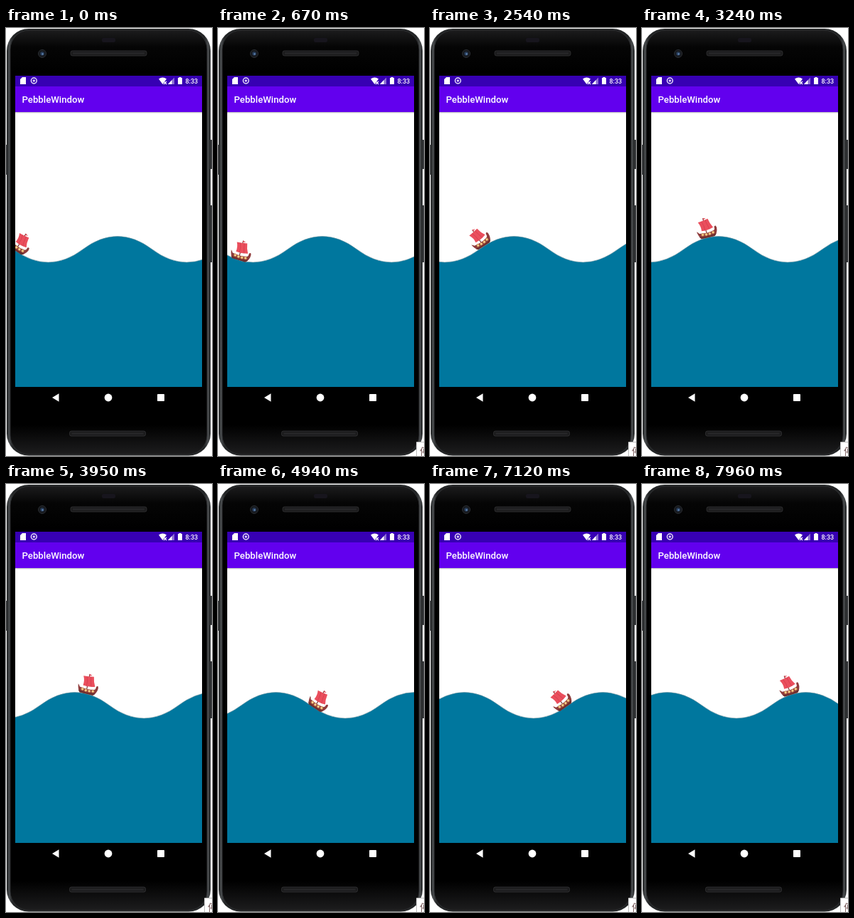
An HTML page without scripts for the animation above (8000 ms loop, 290 by 601 pixels).

```html
<!DOCTYPE html>
<html lang="en">
<head>
<meta charset="utf-8">
<title>Boat on a wave</title>
<style>
  html, body { margin: 0; width: 100%; height: 100%; overflow: hidden; background: #fff; }
  svg { display: block; width: 290px; height: 601px; }
  text { font-family: Roboto, sans-serif; fill: #fff; }
  .title { font-size: 13.2px; font-weight: 500; }
  .clock { font-size: 9px; font-weight: 500; }
  .tip { font: 13px "Noto Sans CJK SC", "Noto Sans CJK", sans-serif; fill: #705050; }
</style>
</head>
<body>
<svg viewBox="0 0 290 601">
  <defs>
    <linearGradient id="rim">
      <stop offset="0" stop-color="#1b1d1e"/>
      <stop offset=".012" stop-color="#4a4d4f"/>
      <stop offset=".03" stop-color="#222425"/>
      <stop offset=".97" stop-color="#222425"/>
      <stop offset=".988" stop-color="#4a4d4f"/>
      <stop offset="1" stop-color="#1b1d1e"/>
    </linearGradient>
    <linearGradient id="face" x2="0" y2="1">
      <stop offset="0" stop-color="#1c1c1d"/>
      <stop offset=".04" stop-color="#050505"/>
      <stop offset=".1" stop-color="#000"/>
      <stop offset=".93" stop-color="#000"/>
      <stop offset="1" stop-color="#1d1d1e"/>
    </linearGradient>
    <clipPath id="view"><path d="M13 118h263v386h-263z"/></clipPath>
    <g id="slot">
      <rect width="107" height="7" rx="2.5" fill="#1b1b1c" stroke="#343436" stroke-width=".8"/>
      <path d="M3 3.5h101" stroke="#29292b" stroke-width="2"/>
    </g>
    <circle id="shield" r="1.9" fill="#f3d08a" stroke="#b5633f" stroke-width=".6"/>
  </defs>

  <!-- phone -->
  <path d="M286 157h4v41h-4zM286 249h4v80h-4z" fill="#393b3d"/>
  <path d="M0 164h2v42h-2z" fill="#4a4c4e"/>
  <rect x="1" y="1" width="287" height="599.5" rx="31" fill="url(#rim)"/>
  <rect x="6" y="3" width="277" height="596" rx="27" fill="url(#face)" stroke="#303234" stroke-width=".8"/>
  <rect x="135" y="14" width="19" height="6" rx="2" fill="#17151d"/>
  <use href="#slot" x="91" y="32"/>
  <use href="#slot" x="89.500" y="566"/>
  <circle cx="51" cy="36" r="5.500" fill="#17191d" stroke="#292c31"/>
  <circle cx="51" cy="36" r="2.800" fill="#263b58"/>
  <circle cx="51.500" cy="36.500" r="1.200" fill="#6689b5"/>

  <!-- screen -->
  <path d="M13 118h263v386h-263z" fill="#fff"/>
  <path d="M13 67h263v15h-263z" fill="#3700b3"/>
  <path d="M13 82h263v36h-263z" fill="#6200ee"/>
  <path d="M13 118.500h263" stroke="#c4c4c8"/>
  <path d="M13 119.500h263" stroke="#ebebed"/>
  <text class="title" x="22.500" y="105">PebbleWindow</text>

  <!-- status icons -->
  <g fill="#fff">
    <path d="M23 69h5v10h-8v-7z"/>
    <circle cx="39.300" cy="74" r="3.900" fill="none" stroke="#e8e0fa" stroke-width="1.500"/>
    <circle cx="39.300" cy="74" r="1.700" fill="#d9ccf5"/>
    <path d="M215 71.500q5.500 -4 11 0l-5.500 7.500z"/>
    <path d="M222 75l4 4m0 -4l-4 4" stroke="#fff" stroke-width="1.200"/>
    <path d="M237 69.500v9.500h-9z" fill="#8d70d3"/>
    <path d="M233.500 73v6h-5.500z"/>
    <path d="M242 70h1.500v-1h3v1h1.500v9h-6z"/>
  </g>
  <text class="clock" x="252.500" y="77.500">8:33</text>

  <!-- wave carries the boat left while the boat sails right along the crest line -->
  <g clip-path="url(#view)">
    <g>
      <animateTransform attributeName="transform" type="translate" from="0 0" to="-122.1 0" dur="8s" repeatCount="indefinite"/>
      <path d="M10.750 310.750q48.750 36.500 97.500 0t97.500 0t97.500 0t97.500 0V510H10.750z" fill="#00779e" stroke="#6f929d" stroke-width=".6"/>
      <g>
        <animateMotion path="M10.750 310.750q48.750 36.500 97.500 0t97.500 0t97.500 0t97.500 0" rotate="auto" calcMode="linear" keyPoints=".0083;.8306" keyTimes="0;1" dur="8s" repeatCount="indefinite"/>
        <path d="M-1 -4L-2 -28" stroke="#7b3a38" stroke-width="1.200"/>
        <path d="M-2 -28l4 1l-4 1.300z" fill="#e34b58"/>
        <path d="M-10 -23.500Q-3 -24 4.500 -25.800Q6 -18 9.500 -12.500Q1 -9.500 -7.500 -10.500Q-6.500 -17 -10 -23.500z" fill="#ea4f5d"/>
        <path d="M-5 -23.600Q-2 -17 -2.500 -10.800M.500 -24.600Q2 -17 4 -11.300" fill="none" stroke="#d63e50" stroke-width=".8"/>
        <path d="M-14.500 -11Q-12.500 -9.500 -11.500 -7.500Q0 -5.500 9 -8Q11.500 -9 11 -12Q11 -14.500 13.500 -14Q14.800 -12 14 -8Q12.500 -2 9 0H-10Q-13.500 -4 -14.500 -11z" fill="#8f3b3b"/>
        <path d="M-12.500 -3Q0 -.500 12 -3.500Q11 -1 9 0H-10z" fill="#69302f"/>
        <use href="#shield" x="-7" y="-5.200"/>
        <use href="#shield" x="-2" y="-4.600"/>
        <use href="#shield" x="3" y="-4.700"/>
        <use href="#shield" x="8" y="-5.600"/>
      </g>
    </g>
  </g>

  <!-- navigation -->
  <g fill="#fff">
    <path d="M65 519l9.500 -5.700v11.400z"/>
    <circle cx="144" cy="519" r="5.400"/>
    <rect x="213" y="514" width="10" height="10" rx=".8"/>
  </g>

  <!-- tooltip corner -->
  <g opacity="0">
    <animate attributeName="opacity" values="0;1" keyTimes="0;.01625" calcMode="discrete" dur="8s" repeatCount="indefinite"/>
    <path d="M279.500 602v-20.500h12V602z" fill="#fff" stroke="#bdbdbd"/>
    <text class="tip" x="284" y="599">停</text>
  </g>
</svg>
</body>
</html>
```
